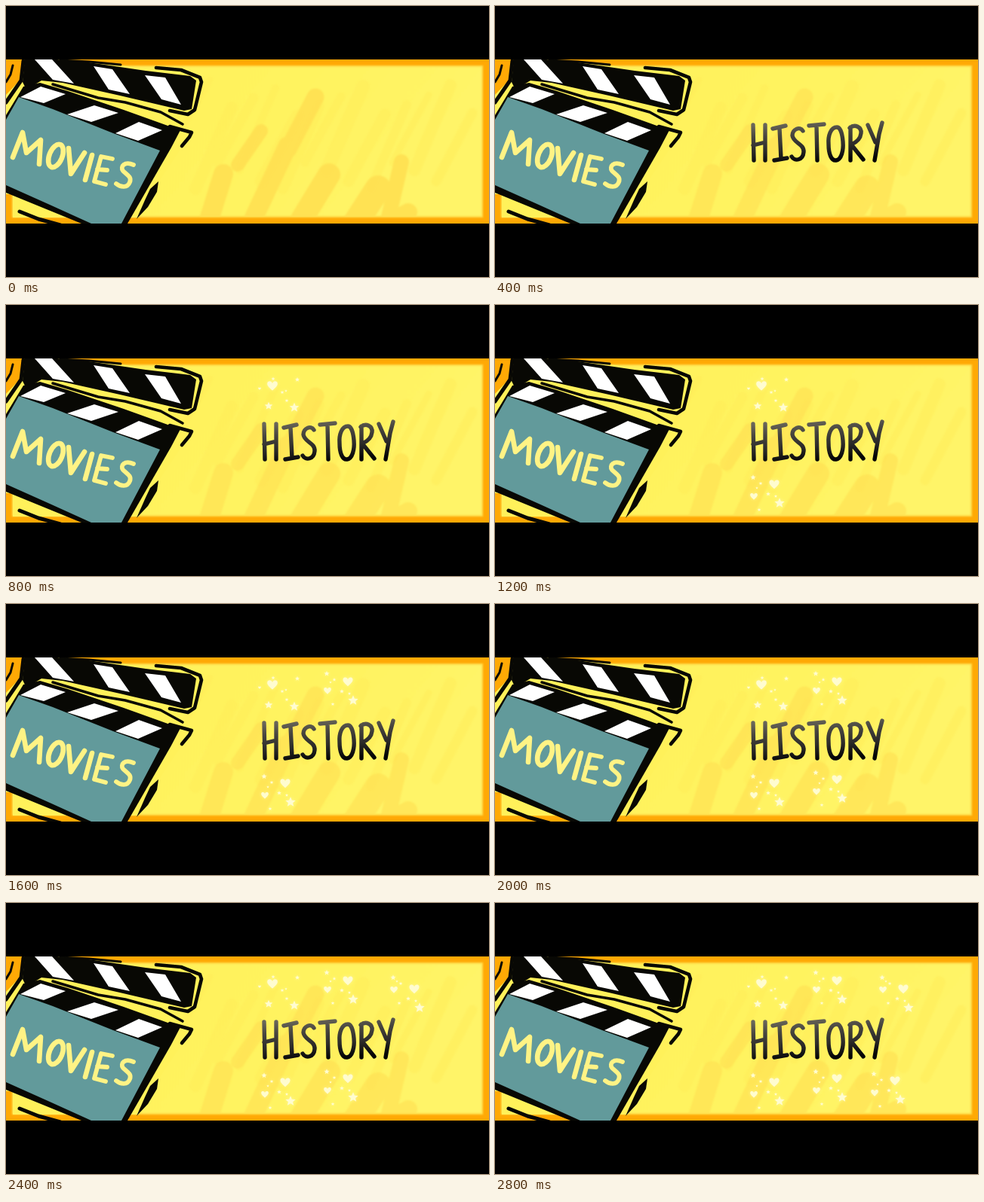
Recreate the animation shown at these times as an HTML page. Size 640 by 360 pixels, loop 3.6 s.

```html
<!DOCTYPE html>
<html lang="en">
<head>
<meta charset="utf-8">
<title>Movies: History</title>
<style>
  html, body { margin: 0; width: 100%; height: 100%; overflow: hidden; background: #000; }
  svg { display: block; width: 100vw; height: 100vh; }
</style>
</head>
<body>
<svg viewBox="0 0 640 360" role="img" aria-label="Movies: History">
  <defs>
    <clipPath id="banner"><rect y="71" width="640" height="218"/></clipPath>
    <clipPath id="panel"><rect x="9" y="80" width="622" height="200"/></clipPath>
    <linearGradient id="paper" x1="0" y1="0" x2="1" y2=".25">
      <stop offset="0" stop-color="#fff15a"/>
      <stop offset=".55" stop-color="#fff35e"/>
      <stop offset="1" stop-color="#fff468"/>
    </linearGradient>
    <linearGradient id="ink" gradientUnits="userSpaceOnUse" x1="400" y1="154" x2="404" y2="208">
      <stop offset="0" stop-color="#6a675a"/>
      <stop offset=".3" stop-color="#47453f"/>
      <stop offset=".65" stop-color="#2c2b29"/>
      <stop offset="1" stop-color="#050506"/>
    </linearGradient>
    <filter id="soft" x="-5%" y="-5%" width="110%" height="110%"><feGaussianBlur stdDeviation="1.2"/></filter>
    <filter id="glow" x="-50%" y="-50%" width="200%" height="200%"><feGaussianBlur stdDeviation="2"/></filter>
    <path id="heart" d="M0 6C-4 2-7 0-6-3.5C-5-6-1-6 0-2.5C1-6 5-6 6-3.5C7 0 4 2 0 6Z"/>
    <path id="star" d="M0-7L2-2.3L7-2L3.2 1.2L4.4 6L0 3.4L-4.4 6L-3.2 1.2L-7-2L-2-2.3Z"/>
  </defs>

  <g clip-path="url(#banner)">
    <rect y="71" width="640" height="218" fill="#ffa905"/>
    <rect x="8" y="79" width="624" height="202" fill="#ffdc48" filter="url(#soft)"/>
    <rect x="10" y="81" width="620" height="198" fill="url(#paper)" filter="url(#soft)"/>

    <g clip-path="url(#panel)" fill="none" stroke-linecap="round" filter="url(#soft)">
      <g id="pale" stroke="#ffea58" opacity=".45"></g>
      <g id="strong" stroke="#ffe052"></g>
    </g>

    <!-- yellow halo around the clapper -->
    <path fill="#fff15a" d="M0 125L22 71H70L160 80L258 93L248 141L228 147L246 168L198 240L176 281H9V250H0Z"/>
    <path fill="#ffa905" d="M0 71H24L20 98L0 119Z"/>
    <path fill="#fff15a" d="M0 118L20 97L24 109L0 148Z"/>

    <!-- loose brush lines -->
    <g fill="none" stroke="#080804" stroke-linecap="round" stroke-linejoin="round" stroke-width="4">
      <path d="M72 72L110 74L152 78" stroke-width="3"/>
      <path d="M199 82L232 85L257 95L259 101L250 138L241 144L217 139" stroke-width="4.6"/>
      <path d="M62 104L122 122L158 128L205 141L234 157" stroke-width="3.6"/>
      <path d="M217 160L246 168L243 174L233 186" stroke-width="4.6"/>
      <path d="M9 79L6 91L0 101" stroke-width="3"/>
      <path d="M23 73L20 99L0 128" stroke-width="5"/>
      <path d="M18 273L43 283L72 291" stroke-width="5"/>
    </g>
    <path fill="#080804" d="M202 233L200 247L188 267L173 283L184 258L191 243Z"/>

    <!-- upper arm -->
    <path fill="#080804" d="M25 71H68L110 75L185 86L244 93L252 99L246 137L236 139L151 119L75 102L47 99L27 111L22 101Z"/>
    <!-- slate -->
    <path fill="#080804" d="M23 107L45 102L82 113L156 138L231 165L219 188L161 289H100L0 248V145Z"/>
    <path fill="#629a9b" d="M17 121L62 137L142 169L204 192L184 230L153 289H113L58 264L0 238V151Z"/>
    <path fill="#fff" d="M38 71H61L90 103L62 98ZM116 80L141 84L164 117L136 111ZM184 92L211 95L232 131L206 124Z
      M46 107L79 117L50 129L19 121ZM117 132L149 142L113 154L81 144ZM176 154L207 165L175 179L145 169Z"/>

    <g fill="none" stroke="#fff385" stroke-width="6.6" stroke-linecap="round" stroke-linejoin="round">
      <path d="M9 201L22 168L27 195L46 178L44 210"/>
      <ellipse cx="66" cy="199" rx="8.5" ry="16" transform="rotate(22 66 199)"/>
      <path d="M83 189L86 223L104 195M114 198L105 231"/>
      <path d="M141 203L126 200L117 233L132 237M121 217L134 218" stroke-width="5.8"/>
      <path d="M169 211C157 206 151 213 155 219C160 224 167 227 164 234C161 242 152 241 146 236" stroke-width="5.8"/>
    </g>

    <g id="title" fill="none" stroke="url(#ink)" stroke-width="5.4" stroke-linecap="round" stroke-linejoin="round">
      <path d="M342 158L343 205M358 158L358 205M342 185L358 181"/>
      <path d="M368 163L385 159M377 162L379 203M370 205L387 202"/>
      <path d="M408 166C404 159 394 164 394 172C395 182 410 183 409 194C408 205 397 207 393 200"/>
      <path d="M416 159L436 157M426 159L427 205"/>
      <path d="M453 161C445 161 441 172 442 184C442 197 446 206 452 205C459 204 462 192 461 180C460 168 457 161 453 161Z"/>
      <path d="M471 161L471 205M470 162C477 156 486 161 485 169C484 178 477 182 472 184L488 204"/>
      <path d="M494 158L504 181M513 155L509 170L503 205"/>
    </g>
    <g id="sparkles"></g>
  </g>
</svg>
<script>
const LOOP = 3600;
const $ = id => document.getElementById(id);

const streak = ([x1, y1, x2, y2, w]) =>
  `<path d="M${x1} ${y1}L${x2} ${y2}" stroke-width="${w}"/>`;

$('pale').innerHTML = Array.from({ length: 13 }, (_, i) => {
  const x = 270 + i * 29, y = 98 + (i * 37) % 50;
  return streak([x, y, x - 48, y + 85 + (i * 23) % 45, 9 + (i * 7) % 10]);
}).join('');

$('strong').innerHTML = [
  [373, 186, 328, 282, 25], [428, 224, 391, 285, 30], [410, 121, 374, 190, 23],
  [288, 223, 269, 284, 26], [493, 242, 462, 290, 34], [524, 207, 507, 280, 20],
  [338, 166, 307, 211, 18], [533, 274, 505, 289, 24]
].map(streak).join('');

// Sparkle parts: shape, x, y, scale
const topLeft = [
  ['heart', 5, -27, 1.1], ['star', 0, 0, .75], ['star', 34, 2, .9], ['star', 38, -35, .42],
  ['heart', -12, -23, .3], ['star', 6, -36, .35], ['star', 18, -18, .33],
  ['star', 24, -7, .33], ['star', 23, -20, .25]
];
// The left half of a spray can sit higher than the right half
const spray = lift => [
  ['star', 0, 0, .95], ['heart', -7, -25, 1.05], ['star', -15, -12, .4], ['star', -5, -9, .3],
  ['heart', -34, -9 - lift, .78], ['star', -35, -34 - lift * .4, .5],
  ['star', -25, -26 - lift * .4, .33], ['star', -27, 9 - lift, .33], ['star', -30, -20 - lift, .25]
];

// Start time, position, parts
const bursts = [
  [800, 348, 134, topLeft], [1200, 377, 263, spray(0)],
  [1600, 460, 128, spray(4)], [2000, 460, 258, spray(0)],
  [2400, 548, 139, spray(15)], [2800, 537, 261, spray(0)]
].map(([start, x, y, parts]) => {
  const g = document.createElementNS('http://www.w3.org/2000/svg', 'g');
  const shapes = parts.map(([id, px, py, s]) =>
    `<use href="#${id}" transform="translate(${px} ${py}) scale(${s})"/>`).join('');
  g.setAttribute('transform', `translate(${x} ${y})`);
  g.innerHTML = `<g fill="#fffac0" opacity=".6" filter="url(#glow)">${shapes}</g><g fill="#fffcd0">${shapes}</g>`;
  $('sparkles').append(g);
  return { start, g };
});

const show = (el, on) => el.setAttribute('visibility', on ? 'visible' : 'hidden');

function draw(now) {
  const t = now % LOOP;
  show($('title'), t >= 400);
  $('strong').setAttribute('opacity', t < 400 ? .9 : .65);
  bursts.forEach(({ start, g }) => show(g, t >= start));
}

const began = performance.now();
function tick() {
  draw(performance.now() - began);
  requestAnimationFrame(tick);
}
tick();
</script>
</body>
</html>
```
